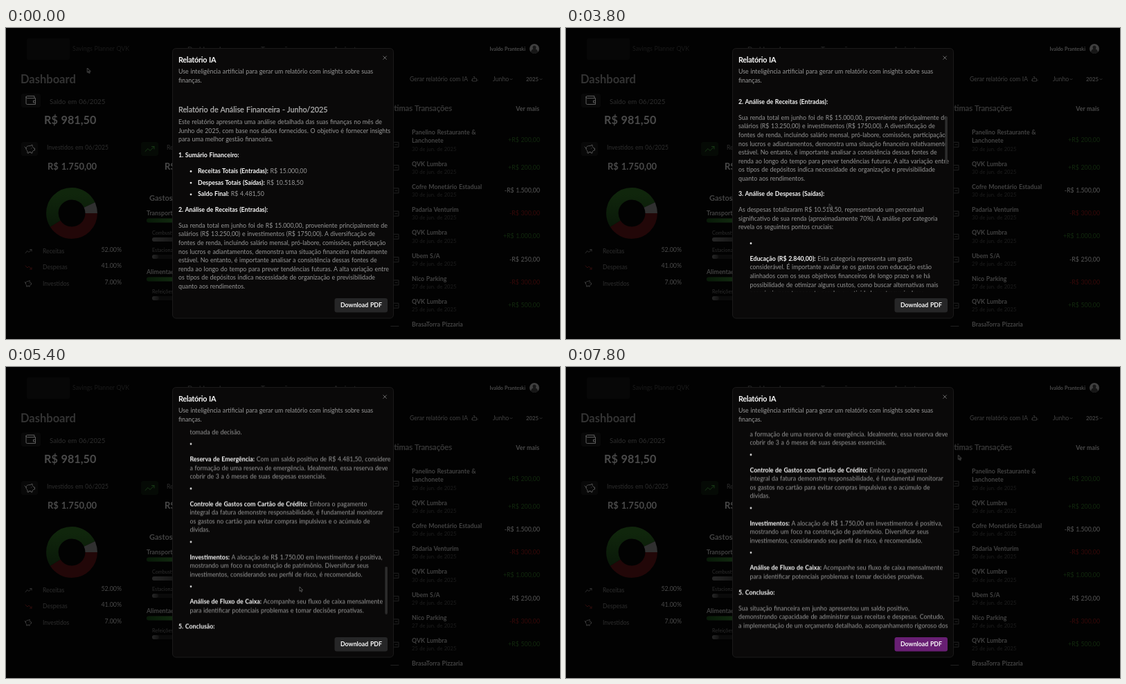
Animation, 800 px wide and 450 px high, one loop 8000 ms. Source, as an HTML page:

```html
<!DOCTYPE html>
<html lang="pt-BR">
<head>
<meta charset="utf-8">
<title>Relatório IA</title>
<style>
  html, body { margin: 0; width: 100%; height: 100%; overflow: hidden; background: #020202; }
  svg { display: block; width: 100vw; height: 100vh; }
  text { font-family: Lato, sans-serif; font-size: 8.8px; word-spacing: .05em; white-space: pre; }
  .b { font-weight: 700; }
  .end { text-anchor: end; }
  .medium { stroke: currentColor; stroke-width: .25; fill: currentColor; }
  .icon { fill: none; stroke: #333; stroke-width: 1; stroke-linecap: round; stroke-linejoin: round; }
  .nav { font-size: 10px; fill: #222; }
  .muted { fill: #999; }
  .strong { fill: #fafafa; font-weight: 700; }
  .label { fill: #424242; }
  .soft { fill: #2e2e2e; }
  .value { fill: #4a4a4a; }
  .date { font-size: 7.6px; fill: #1e1e1e; }
  .gain { fill: #12290e; }
  .spend { fill: #585858; }
  .loss { fill: #360909; }

  .scroll, .thumb, .cursor, .show, .beam, .arrow, .button { animation: 8s linear infinite; }
  .scroll { animation-name: scroll; }
  .thumb { animation-name: thumb; }
  .cursor { animation-name: cursor; }
  .show { animation-name: show; animation-timing-function: step-end; }
  .beam { animation-name: beam; animation-timing-function: step-end; }
  .arrow { animation-name: arrow; animation-timing-function: step-end; }
  .button { animation-name: hover; animation-timing-function: step-end; }

  /* Every step lasts 200 ms */
  @keyframes scroll {
    0% { transform: translateY(0); animation-timing-function: step-end; }
    40% { transform: translateY(0); animation-timing-function: steps(5); }
    52.5% { transform: translateY(-260.2px); animation-timing-function: steps(4); }
    62.5% { transform: translateY(-521px); animation-timing-function: steps(2); }
    67.5% { transform: translateY(-833.5px); animation-timing-function: steps(3); }
    75% { transform: translateY(-934.5px); animation-timing-function: step-end; }
    77.5% { transform: translateY(-934.5px); animation-timing-function: steps(2); }
    82.5%, 100% { transform: translateY(-882.5px); }
  }
  @keyframes thumb {
    0% { transform: translateY(0); animation-timing-function: step-end; }
    40% { transform: translateY(0); animation-timing-function: steps(5); }
    52.5% { transform: translateY(61.4px); animation-timing-function: steps(4); }
    62.5% { transform: translateY(123px); animation-timing-function: steps(2); }
    67.5% { transform: translateY(197.5px); animation-timing-function: steps(3); }
    75% { transform: translateY(221px); animation-timing-function: step-end; }
    77.5% { transform: translateY(221px); animation-timing-function: steps(2); }
    82.5%, 100% { transform: translateY(208.7px); }
  }
  @keyframes cursor {
    0% { transform: translate(117.5px, 58px); animation-timing-function: step-end; }
    10% { transform: translate(117.5px, 58px); animation-timing-function: steps(6); }
    25% { transform: translate(509px, 250px); animation-timing-function: steps(3); }
    32.5% { transform: translate(499.5px, 245px); animation-timing-function: steps(3); }
    40% { transform: translate(325px, 255px); animation-timing-function: steps(5); }
    52.5% { transform: translate(417px, 254px); animation-timing-function: steps(4); }
    62.5% { transform: translate(427.5px, 311px); animation-timing-function: steps(2); }
    67.5% { transform: translate(424px, 318px); animation-timing-function: steps(3); }
    75% { transform: translate(427px, 326px); animation-timing-function: steps(2); }
    80% { transform: translate(435px, 330px); animation-timing-function: steps(2); }
    85% { transform: translate(512px, 402px); animation-timing-function: steps(3); }
    92.5% { transform: translate(515px, 405px); animation-timing-function: steps(2); }
    97.5%, 100% { transform: translate(566.5px, 127.5px); }
  }
  @keyframes show { 0%, 90% { opacity: 0; } 27.5% { opacity: 1; } 100% { opacity: 0; } }
  @keyframes beam { 0%, 65% { opacity: 0; } 60% { opacity: 1; } 100% { opacity: 0; } }
  @keyframes arrow { 0%, 65% { opacity: 1; } 60% { opacity: 0; } 100% { opacity: 1; } }
  @keyframes hover { 0% { fill: #262627; } 85%, 100% { fill: #681f73; } }
</style>
</head>
<body>
<svg viewBox="0 0 800 450">
  <defs>
    <clipPath id="view"><rect x="241" y="89.5" width="318" height="292.5"/></clipPath>
    <clipPath id="page"><rect width="800" height="432"/></clipPath>
    <linearGradient id="green"><stop stop-color="#081a08"/><stop offset="1" stop-color="#122a10"/></linearGradient>
    <linearGradient id="grey"><stop stop-color="#262626"/><stop offset="1" stop-color="#121212"/></linearGradient>
    <linearGradient id="fall" x2="0" y2="1"><stop stop-color="#10260c"/><stop offset="1" stop-color="#081608"/></linearGradient>
  </defs>
  <rect width="800" height="450" fill="#020202"/>

  <g id="dash" clip-path="url(#page)">
    <rect x="30" y="15" width="62" height="31" rx="2" fill="#070707"/>
    <text x="96" y="33" fill="#1a1a1a">Savings Planner QVK</text>
    <text class="b nav" x="262" y="33.5">Dashboard</text>
    <text class="b nav" x="368" y="33.5">Transações</text>
    <text class="b nav" x="473" y="33.5">Assinatura</text>
    <text class="b end value" x="750" y="33" style="font-size:7.2px">Ivaldo Pranteski</text>
    <circle cx="763" cy="30" r="7" fill="#404040"/>
    <path d="M758 35a5 5 0 0 1 10 0a7 7 0 0 1-10 0z" fill="#161616"/>
    <circle cx="763" cy="28" r="2.5" fill="#161616"/>

    <text class="b" x="21" y="80" fill="#343434" style="font-size:16.5px">Dashboard</text>
    <text class="label" x="583" y="77" style="font-size:8.5px">Gerar relatório com IA</text>
    <path class="icon" d="M674 73h5.5v4h-5.5zM676.7 73v-2.5h-1.5M672.7 75v1M681 75v1"/>
    <text class="label" x="703" y="77">Junho</text>
    <text class="b label" x="751" y="77" style="font-size:7.8px">2025</text>
    <path class="icon" stroke-width=".7" d="M728 73.5l1.5 1.5 1.5-1.5M771 73.5l1.5 1.5 1.5-1.5"/>

    <g fill="#080808">
      <rect x="22" y="95" width="28" height="20" rx="3"/>
      <rect x="22" y="165" width="24" height="20" rx="3"/>
      <rect x="195" y="165" width="25" height="20" rx="3" fill="#050a05"/>
    </g>
    <path class="icon" style="stroke:#5c5c5c" d="M41 101v-2.5h-10.5a1.5 1.5 0 0 0 0 3h12v9h-12a1.5 1.5 0 0 1-1.5-1.5v-9.5M42.5 105h-3v3h3"/>
    <path id="pig" class="icon" style="stroke:#505050" d="M29 174c0-3 3-3.5 6-3.5l3-1.5v2.5c1 .5 1.5 1.5 2 2.5h1.5v3h-1.5l-2 2v2h-2v-1.5h-3v1.5h-2v-3c-1.5-1-2-2-2-4zM27 172l2 2M36.5 174h.1"/>
    <path class="icon" style="stroke:#183a16" d="M201 178.5l4-4 3 3 6-6M210.5 171.5h3.5v3.5"/>

    <text class="soft" x="63" y="109.5" style="font-size:9.7px">Saldo em 06/2025</text>
    <text class="b value" x="55" y="139" style="font-size:16.2px">R$ 981,50</text>
    <text class="soft" x="59" y="176" style="font-size:8.6px">Investidos em 06/2025</text>
    <text class="b value" x="60" y="205" style="font-size:13px">R$ 1.750,00</text>
    <text class="soft" x="232" y="176" style="font-size:8.6px">Receita</text>
    <text class="b value" x="229" y="205" style="font-size:13px">R$ 15.000,00</text>

    <g fill="none" stroke-width="17.5">
      <circle cx="95" cy="268" r="28.2" pathLength="100" stroke="#220708" stroke-dasharray="41 59"/>
      <circle cx="95" cy="268" r="28.2" pathLength="100" stroke="url(#fall)" stroke-dasharray="52 48" stroke-dashoffset="-41"/>
      <circle cx="95" cy="268" r="28.2" pathLength="100" stroke="#303030" stroke-dasharray="7 93" stroke-dashoffset="-93"/>
    </g>
    <path class="icon" style="stroke:#303030" d="M28 325.5l3-3 2 2 4-4M34.5 320.5h2.5v2.5"/>
    <path class="icon" style="stroke:#300c0c" d="M28 344l3 3 2-2 4 4M34.5 349h2.5v-2.5"/>
    <use href="#pig" transform="translate(9.5 242) scale(.65 .73)"/>

    <text class="b label" x="207" y="250" style="font-size:11px">Gastos por categoria</text>
  </g>

  <rect x="240.5" y="29.5" width="319" height="390.5" rx="5" fill="#0a0909" stroke="#1b1a1a"/>
  <text class="strong" x="249" y="50" style="font-size:10.8px;letter-spacing:-.025em">Relatório IA</text>
  <text class="muted" x="249" y="66">Use inteligência artificial para gerar um relatório com insights sobre suas</text>
  <text class="muted" x="249" y="78.5">finanças.</text>
  <path class="icon" style="stroke:#858585;stroke-width:.8" d="M544.8 40.8l4.6 4.6M549.4 40.8l-4.6 4.6"/>
  <g clip-path="url(#view)"><g class="scroll" id="report"></g></g>
  <g class="show"><rect class="thumb" x="547.3" y="91" width="3.6" height="69" rx="1.8" fill="#2c2c2c"/></g>
  <rect class="button" x="474.5" y="391" width="76.5" height="20.5" rx="3" fill="#262627"/>
  <text class="strong" x="513" y="404.3" text-anchor="middle">Download PDF</text>

  <g class="cursor">
    <path class="arrow" d="M0 0v6.4l1.4-1.3 1.1 2.4 1.1-.5-1-2.3h1.9z" fill="#000" stroke="#858585" stroke-width=".6"/>
    <path class="beam" d="M0 0q2 0 2 1.5q0-1.500 2-1.5M2 1.5v5M0 8q2 0 2-1.5q0 1.5 2 1.5M1 4.5h2" fill="none" stroke="#aaa" stroke-width=".8"/>
  </g>
</svg>
<script>
const LINE = 12.54, GAP = 22.8, ITEM_GAP = 16.7;
const dash = document.getElementById('dash');
const text = (x, y, s, attrs = '') => `<text x="${x}" y="${y}" ${attrs}>${s}</text>`;

// Kinds: h heading, p paragraph, l one-line bullet, i bullet above its text
const blocks = [
  ['p', `Este relatório apresenta uma análise detalhada das suas finanças no mês de
Junho de 2025, com base nos dados fornecidos. O objetivo é fornecer insights
para uma melhor gestão financeira.`],
  ['h', '1. Sumário Financeiro:'],
  ['l', '*Receitas Totais (Entradas):* R$ 15.000,00'],
  ['l', '*Despesas Totais (Saídas):* R$ 10.518,50'],
  ['l', '*Saldo Final:* R$ 4.481,50'],
  ['h', '2. Análise de Receitas (Entradas):'],
  ['p', `Sua renda total em junho foi de R$ 15.000,00, proveniente principalmente de
salários (R$ 13.250,00) e investimentos (R$ 1750,00). A diversificação de
fontes de renda, incluindo salário mensal, pró-labore, comissões, participação
nos lucros e adiantamentos, demonstra uma situação financeira relativamente
estável. No entanto, é importante analisar a consistência dessas fontes de
renda ao longo do tempo para prever tendências futuras. A alta variação entre
os tipos de depósitos indica necessidade de organização e previsibilidade
quanto aos rendimentos.`],
  ['h', '3. Análise de Despesas (Saídas):'],
  ['p', `As despesas totalizaram R$ 10.518,50, representando um percentual
significativo de sua renda (aproximadamente 70%). A análise por categoria
revela os seguintes pontos cruciais:`],
  ['i', `*Educação (R$ 2.840,00):* Esta categoria representa um gasto
considerável. É importante avaliar se os gastos com educação estão
alinhados com os seus objetivos financeiros de longo prazo e se há
possibilidade de otimizar alguns custos, como buscar alternativas mais
acessíveis para transporte escolar ou atividades extracurriculares.`],
  ['i', `*Alimentação (R$ 3.298,50):* Esta categoria também apresenta um valor
significativo. É recomendável analisar detalhadamente os gastos com
alimentação fora do lar (R$ 398,50) e verificar a possibilidade de reduzir
esses custos preparando mais refeições em casa. Acompanhar as
despesas em supermercados e açougues pode ajudar a identificar
oportunidades de economia.`],
  ['i', `*Transporte (R$ 1.500,00):* O custo com combustível demonstra a
dependência do automóvel. Avaliar a possibilidade de uso de transporte
público ou carona em alguns dias da semana poderia gerar economia
considerável.`],
  ['i', `*Outras Despesas:* Inclui serviços públicos, planos de saúde e pagamento
integral de cartão de crédito. A saúde e os serviços são importantes para
a qualidade de vida, mas é importante observar os valores e buscar
alternativas caso sejam muito altos. O pagamento total da fatura do
cartão demonstra responsabilidade, mas é imprescindível monitorar os
gastos para evitar o endividamento.`],
  ['h', '4. Insights Financeiros e Recomendações:'],
  ['i', `*Orçamento:* Criar um orçamento mensal detalhado é crucial para
controlar melhor seus gastos e alcançar seus objetivos financeiros.
Utilize planilhas ou aplicativos para organizar os dados e facilitar a
tomada de decisão.`],
  ['i', `*Reserva de Emergência:* Com um saldo positivo de R$ 4.481,50, considere
a formação de uma reserva de emergência. Idealmente, essa reserva deve
cobrir de 3 a 6 meses de suas despesas essenciais.`],
  ['i', `*Controle de Gastos com Cartão de Crédito:* Embora o pagamento
integral da fatura demonstre responsabilidade, é fundamental monitorar
os gastos no cartão para evitar compras impulsivas e o acúmulo de
dívidas.`],
  ['i', `*Investimentos:* A alocação de R$ 1.750,00 em investimentos é positiva,
mostrando um foco na construção de patrimônio. Diversificar seus
investimentos, considerando seu perfil de risco, é recomendado.`],
  ['i', `*Análise de Fluxo de Caixa:* Acompanhe seu fluxo de caixa mensalmente
para identificar potenciais problemas e tomar decisões proativas.`],
  ['h', '5. Conclusão:'],
  ['p', `Sua situação financeira em junho apresentou um saldo positivo,
demonstrando capacidade de administrar suas receitas e despesas. Contudo,
a implementação de um orçamento detalhado, acompanhamento rigoroso dos
gastos e otimização em algumas categorias, como alimentação e transporte,
podem maximizar seus recursos e alcançar seus objetivos financeiros a longo
prazo. O monitoramento contínuo e a revisão periódica do seu orçamento são
essenciais para manter a saúde financeira.`],
];

const left = { h: 249, p: 249, l: 277, i: 265.5 };
const dot = y => `<circle cx="267" cy="${y + .5}" r="1.4" fill="#e8e8e8"/>`;
let out = text(249, 122.3, 'Relatório de Análise Financeira - Junho/2025',
  'class="medium" color="#b4b4b4" style="font-size:10.8px"');
let y = 136.2 - GAP, last = '';
for (const [kind, body] of blocks) {
  const listed = kind === 'l' || kind === 'i';
  y += listed && kind === last ? ITEM_GAP : GAP;
  if (listed) out += dot(y);
  if (kind === 'i') y += GAP;
  body.split('\n').forEach((s, n) => {
    if (n) y += LINE;
    const rich = s.replace(/\*(.+)\*/, '<tspan class="strong">$1</tspan>');
    out += text(left[kind], y + 3, rich, `class="${kind === 'h' ? 'strong' : 'muted'}"`);
  });
  last = kind;
}
document.getElementById('report').innerHTML = out;

// Dashboard behind the dialog
let back = '';
[['Receitas', '52.00%'], ['Despesas', '41.00%'], ['Investidos', '7.00%']].forEach(([name, share], n) => {
  const y = 326 + n * 23.3;
  back += text(53, y, name, 'class="soft" style="font-size:8.6px"');
  back += text(167, y - 2, share, 'class="end value"');
});

[[203, 271, 'Transporte', 40], [211, 298.5, 'Combustível', 40], [211, 323.5, 'Estacionamento', 9],
 [203, 356, 'Alimentação', 40], [211, 383.5, 'Refeições', 10]].forEach(([x, y, name, width]) => {
  const main = x === 203;
  back += text(x, y, name, main ? 'class="b label"' : 'class="soft" style="font-size:7.2px"');
  back += `<rect x="${x}" y="${y + 4.5}" width="50" height="6" rx="3" fill="#0a0a0a"/>`;
  back += `<rect x="${x}" y="${y + 4.5}" width="${width}" height="6" rx="3" fill="url(#${main ? 'green' : 'grey'})"/>`;
});

back += text(644, 119.7, 'Últimas Transações', 'class="end medium" color="#3c3c3c" style="font-size:11.2px"');
back += text(770, 120, 'Ver mais', 'class="b end value"');
back += text(586, 153.5, 'Panelino Restaurante &amp;', 'class="b label"');
[['Lanchonete', 30, '+R$ 200,00', 'gain'], ['QVK Lumbra', 30, '+R$ 200,00', 'gain'],
 ['Cofre Monetário Estadual', 30, '-R$ 1.500,00', 'spend'], ['Padaria Venturim', 30, '-R$ 300,00', 'loss'],
 ['QVK Lumbra', 30, '+R$ 1.000,00', 'gain'], ['Ubem S/A', 29, '-R$ 250,00', 'spend'],
 ['Nico Parking', 27, '-R$ 300,00', 'loss'], ['QVK Lumbra', 25, '+R$ 500,00', 'gain'],
 ['BrasaTorra Pizzaria', 25, '', 'loss']].forEach(([name, day, sum, tone], n) => {
  const y = 166.3 + n * 33.27;
  back += text(586, y, name, 'class="b label"');
  back += text(586, y + 11.2, `${day} de jun. de 2025`, 'class="date"');
  back += text(771, n ? y + 5 : 164.5, sum, `class="end ${tone}"`);
  back += `<path class="icon" style="stroke:#222" d="M556 ${y - 1}h11v7h-11zM562 ${y + 2.5}h3"/>`;
});
dash.insertAdjacentHTML('beforeend', back);
</script>
</body>
</html>
```
